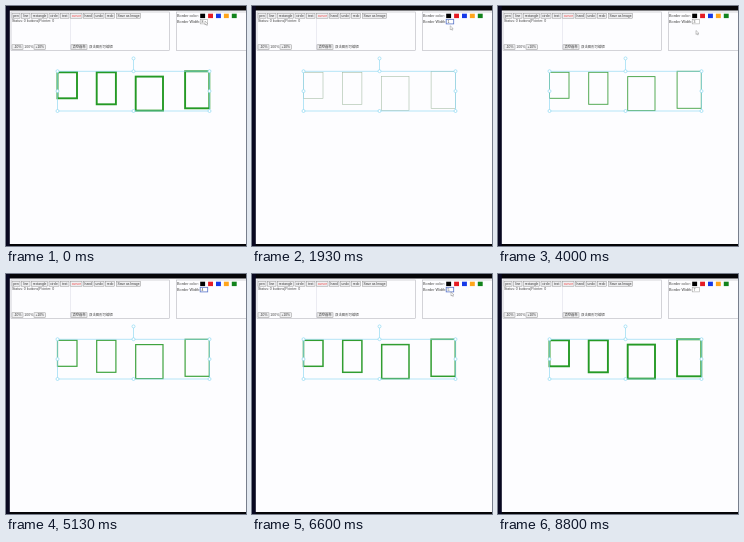
An HTML page with a canvas for the animation above (8870 ms loop, 240 by 240 pixels).

```html
<!DOCTYPE html>
<html lang="en">
<head>
<meta charset="utf-8">
<style>
html, body { margin: 0; width: 100%; height: 100%; overflow: hidden; background: #fdfdff; }
canvas { display: block; width: 100vw; height: 100vh; }
</style>
</head>
<body>
<canvas id="stage"></canvas>
<script>
const LOOP = 8870;
const canvas = document.getElementById('stage');
const ctx = canvas.getContext('2d');
const SANS = 'Arial, "Liberation Sans", "Noto Sans CJK SC", sans-serif';
const CYAN = '#8ed8f2';

// start time, border width value, drawn thickness, colour
const widths = [
  [0, 8, 1.9, '#259a25'],
  [700, 1, 0.55, '#a0b8a0'],
  [2000, 2, 0.75, '#62ae62'],
  [3400, 3, 0.95, '#4ca64c'],
  [4650, 4, 1.2, '#3fa33f'],
  [5900, 5, 1.5, '#319d31'],
  [7500, 7, 1.9, '#259a25']
];

// time, x, y
const pointer = [
  [0, 199, 15], [700, 198, 18], [1130, 198, 18.5], [1700, 198, 19],
  [2730, 199, 22.5], [4000, 198, 24.5], [4700, 197, 18],
  [5800, 198, 17], [6600, 199, 18], [7400, 198, 17]
];

const buttons = [
  ['pen', 6, 8], ['line', 15.5, 8.5], ['rectangle', 25.5, 16], ['circle', 43, 10],
  ['text', 54.5, 8.5], ['cursor', 64.5, 11.5], ['hand', 77.5, 9.5],
  ['undo', 88.5, 9.5], ['redo', 99.5, 9], ['Save as Image', 110.5, 24]
];

const shapes = [
  [51.5, 66.3, 19.5, 26], [90.7, 66.3, 19.2, 32],
  [129.7, 70.6, 27.3, 34], [179.1, 65.3, 24.2, 37]
];

function label(text, x, y, size = 3.5, color = '#444', align = 'left') {
  ctx.font = `${size}px ${SANS}`;
  ctx.textAlign = align;
  ctx.textBaseline = 'middle';
  ctx.fillStyle = color;
  ctx.fillText(text, x, y);
}

function box(x, y, w, h, stroke, line = 0.5, fill) {
  if (fill) {
    ctx.fillStyle = fill;
    ctx.fillRect(x, y, w, h);
  }
  ctx.strokeStyle = stroke;
  ctx.lineWidth = line;
  ctx.strokeRect(x, y, w, h);
}

function button(text, x, y, w, color = '#333') {
  box(x, y, w, 4.8, '#888', 0.45, '#f0f0f2');
  label(text, x + w / 2, y + 2.5, 3.3, color, 'center');
}

function segment(x1, y1, x2, y2) {
  ctx.beginPath();
  ctx.moveTo(x1, y1);
  ctx.lineTo(x2, y2);
  ctx.stroke();
}

function handle(x, y) {
  ctx.beginPath();
  ctx.arc(x, y, 1.5, 0, Math.PI * 2);
  ctx.fillStyle = '#fff';
  ctx.fill();
  ctx.strokeStyle = CYAN;
  ctx.lineWidth = 0.7;
  ctx.stroke();
}

function drawPage() {
  ctx.fillStyle = '#fdfdff';
  ctx.fillRect(0, 0, 240, 240);
  ctx.fillStyle = '#050508';
  ctx.fillRect(0, 0, 240, 4.5);
  ctx.fillRect(0, 238, 240, 2);
  ctx.fillStyle = '#080820';
  ctx.fillRect(0, 0, 3.8, 240);

  box(5, 6, 158.3, 38.5, '#aaaab2');
  box(170.7, 6, 72, 38.5, '#aaaab2');
  ctx.strokeStyle = '#d8d8e4';
  segment(64.5, 13, 64.5, 44);
}

function drawTools(value, focused) {
  for (const [text, x, w] of buttons) {
    button(text, x, 7.4, w, text === 'cursor' ? '#e44' : '#333');
  }
  label('Status: 0 buttons|Pointer: 0', 6, 15);
  button('-10%', 6, 38.8, 11);
  label('100%', 18.3, 41.3, 3.5);
  button('+10%', 28, 38.8, 11.5);
  button('清空画布', 65, 38.8, 16);
  label('双击图形可编辑', 83, 41.3, 3.4);

  label('Border color:', 171, 10.2, 3.8);
  ['#000', '#e51c24', '#1539e8', '#ffa51c', '#12831c'].forEach((color, i) => {
    ctx.fillStyle = color;
    ctx.fillRect(194.2 + i * 7.9, 7.7, 4.9, 4.4);
  });
  label('Border Width:', 171, 15.7, 3.8);
  box(194.2, 13.3, 7.5, 4.6, focused ? '#5874c8' : '#999', focused ? 0.8 : 0.5, '#fff');
  label(value, 195.5, 15.7, 3.5);
}

function drawShapes(thickness, color) {
  for (const [x, y, w, h] of shapes) box(x, y, w, h, color, thickness);

  box(51.5, 65.2, 152, 39.8, CYAN, 0.65);
  segment(127.5, 54, 127.5, 65);
  handle(127.5, 52.4);
  for (const x of [51.5, 127.5, 203.5]) {
    for (const y of [65.2, 85.1, 105]) {
      if (x !== 127.5 || y !== 85.1) handle(x, y);
    }
  }
}

function drawPointer(t) {
  const last = pointer[pointer.length - 1];
  if (t > last[0] || (t > 4700 && t < 5800)) return;
  const next = Math.max(1, pointer.findIndex(p => p[0] >= t));
  const a = pointer[next - 1], b = pointer[next];
  const k = (t - a[0]) / (b[0] - a[0]);
  ctx.save();
  ctx.translate(a[1] + (b[1] - a[1]) * k, a[2] + (b[2] - a[2]) * k);
  ctx.beginPath();
  ctx.moveTo(0, 0);
  ctx.lineTo(0, 4);
  ctx.lineTo(1, 3.2);
  ctx.lineTo(1.8, 4.6);
  ctx.lineTo(2.3, 4.3);
  ctx.lineTo(1.7, 3);
  ctx.lineTo(3, 2.9);
  ctx.closePath();
  ctx.fillStyle = '#fff';
  ctx.fill();
  ctx.strokeStyle = '#777';
  ctx.lineWidth = 0.4;
  ctx.stroke();
  ctx.restore();
}

function resize() {
  const ratio = window.devicePixelRatio || 1;
  canvas.width = Math.round(innerWidth * ratio);
  canvas.height = Math.round(innerHeight * ratio);
}

function draw(now) {
  const t = now % LOOP;
  const [, value, thickness, color] = widths.filter(step => step[0] <= t).pop();
  const focused = (t > 600 && t < 3300) || (t > 4500 && t < 7600);
  ctx.setTransform(canvas.width / 240, 0, 0, canvas.height / 240, 0, 0);
  drawPage();
  drawTools(String(value), focused);
  drawShapes(thickness, color);
  drawPointer(t);
}

function tick(now) {
  draw(now);
  requestAnimationFrame(tick);
}

addEventListener('resize', resize);
resize();
draw(0);
requestAnimationFrame(tick);
</script>
</body>
</html>
```
